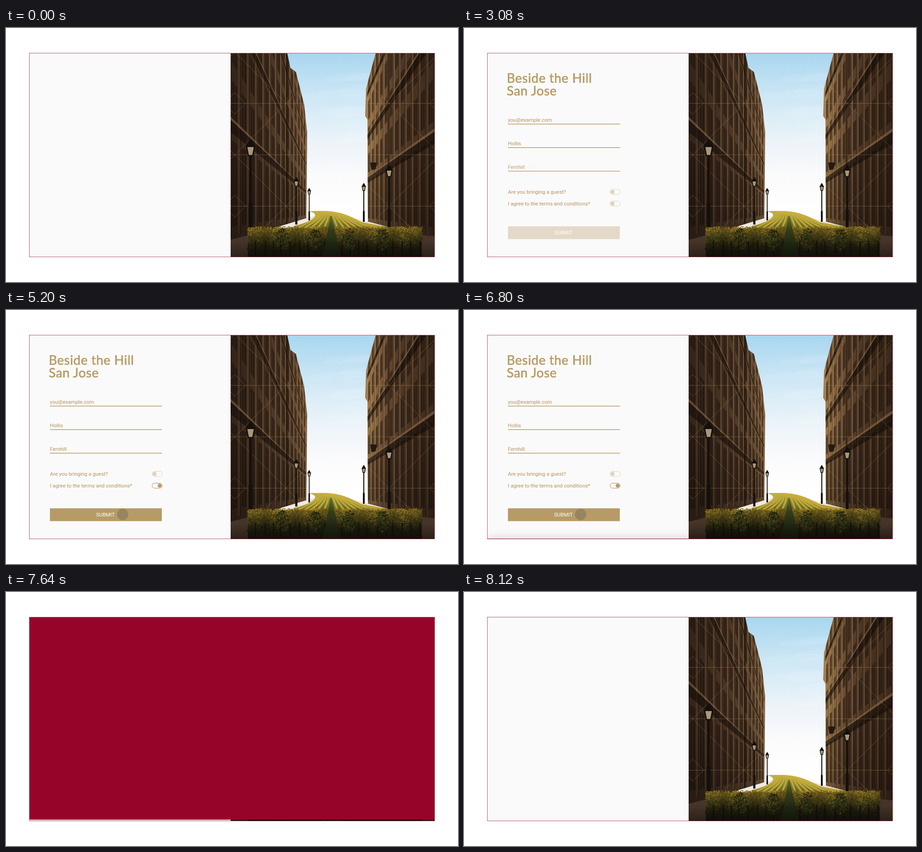
These frames come from a looping animation (998 by 561 pixels, 8320 ms). An HTML page with a canvas:

```html
<!DOCTYPE html>
<html lang="en">
<head>
<meta charset="utf-8">
<title>Event sign-up form</title>
<style>
  html, body { margin: 0; width: 100%; height: 100%; overflow: hidden; background: #fff; }
  body { position: relative; --gold: #b79b66; --pale: #e4d9c8; --faint: #dfd1ba; --ink: #b4915a; }
  .card { position: absolute; left: 52px; top: 56px; width: 894px; height: 450px; overflow: hidden; background: #fafafa; }
  canvas { position: absolute; right: 0; top: 0; }
  svg { position: absolute; left: -52px; top: -56px; }
  .frame { position: absolute; left: 51px; top: 55px; width: 894px; height: 449px; border: 1px solid rgba(150, 5, 41, .68); }
  text { font: 11.44px Roboto, sans-serif; }
  .title { font: 28px Lato, sans-serif; letter-spacing: .7px; fill: var(--gold); stroke: var(--gold); stroke-width: .7px; }
  .label, .val { fill: var(--ink); }
  .val { opacity: 0; }
  .ph, .dot { fill: var(--faint); }
  .line, .pill { fill: none; stroke: var(--faint); }
  .line { stroke-width: 1.6; }
  .btn { fill: var(--pale); }

  .form, .label, .field *, .on *, .btn, .hand, .hand circle, .wipe {
    animation-duration: 8.32s; animation-iteration-count: infinite; animation-timing-function: linear;
  }
  .form { animation-name: form; }
  .label { animation-name: label; }
  .field * { animation-delay: calc(var(--i) * .4s); }
  .field .ph { animation-name: leave; }
  .field .val { animation-name: enter; }
  .field .line { animation-name: line; }
  .on .pill { animation-name: pill; }
  .on .dot { animation-name: dot; }
  .btn { animation-name: btn; }
  .hand { animation-name: hand; }
  .hand circle { fill: rgba(77, 82, 82, .3); animation-name: press; }
  .wipe { position: absolute; inset: 0; background: #960529; box-shadow: 0 0 22px rgba(0, 0, 0, .17); animation-name: wipe; }

  @keyframes form {
    0%, 8.3% { opacity: 0; animation-timing-function: ease-in-out; }
    18.4%, 88% { opacity: 1; }
    88.01%, 100% { opacity: 0; }
  }
  @keyframes label {
    0%, 8.3% { opacity: .4; animation-timing-function: ease-out; }
    21.6%, 100% { opacity: 1; }
  }
  @keyframes leave {
    24.1% { opacity: 1; }
    28%, 92% { opacity: 0; }
    92.01% { opacity: 1; }
  }
  @keyframes enter {
    24.1% { opacity: 0; }
    28%, 92% { opacity: 1; }
    92.01% { opacity: 0; }
  }
  @keyframes line {
    24.1% { stroke: var(--faint); }
    28%, 92% { stroke: var(--gold); }
    92.01% { stroke: var(--faint); }
  }
  @keyframes pill {
    48.7% { stroke: var(--faint); }
    54.5%, 92% { stroke: var(--ink); }
    92.01% { stroke: var(--faint); }
  }
  @keyframes dot {
    48.7% { fill: var(--faint); transform: none; animation-timing-function: ease-out; }
    54.5%, 92% { fill: var(--gold); transform: translateX(11.3px); }
    92.01% { fill: var(--faint); transform: none; }
  }
  @keyframes btn {
    48.7% { fill: var(--pale); }
    53.4% { fill: #ece3d7; }
    58.6%, 92% { fill: var(--gold); }
    92.01% { fill: var(--pale); }
  }
  @keyframes hand {
    0%, 48.7% { transform: translate(355.5px, 387px); opacity: 0; }
    51.4% { transform: translate(355.5px, 387px); opacity: 1; }
    55.8% { transform: translate(355.5px, 387px); opacity: 1; animation-timing-function: ease-in-out; }
    62.7%, 100% { transform: translate(257.5px, 451.7px); opacity: 1; }
  }
  @keyframes press {
    0%, 67.3% { transform: none; animation-timing-function: ease-in-out; }
    69% { transform: scale(1.24); animation-timing-function: ease-in-out; }
    70.7%, 100% { transform: none; }
  }
  @keyframes wipe {
    0%, 81.53% { transform: translateY(100%); opacity: 0; }
    81.54% { transform: translateY(100%); opacity: 1; animation-timing-function: ease-in-out; }
    87.5% { transform: none; opacity: 1; }
    91.47% { transform: none; opacity: 1; animation-timing-function: ease-in-out; }
    97.48% { transform: translateY(-100%); opacity: 1; }
    97.49%, 100% { transform: translateY(-100%); opacity: 0; }
  }
</style>
</head>
<body>
<div class="card">
  <canvas width="450" height="450"></canvas>
  <svg width="998" height="561">
    <g class="form">
      <text class="title" x="94.5" y="121.3">Beside the Hill</text>
      <text class="title" x="94.5" y="148.8">San Jose</text>
      <g class="field" style="--i:0">
        <text class="ph" x="97" y="207.2">Email*</text>
        <text class="val" x="97" y="207.2">you@example.com</text>
        <path class="line" d="M97 212.2H344.5"/>
      </g>
      <g class="field" style="--i:1" transform="translate(0 52)">
        <text class="ph" x="97" y="207.2">First name*</text>
        <text class="val" x="97" y="207.2">Hollis</text>
        <path class="line" d="M97 212.2H344.5"/>
      </g>
      <g class="field" style="--i:2" transform="translate(0 104)">
        <text class="ph" x="97" y="207.2">Last name*</text>
        <text class="val" x="97" y="207.2">Fernhill</text>
        <path class="line" d="M97 212.2H344.5"/>
      </g>
      <text class="label" x="97" y="366.3">Are you bringing a guest?</text>
      <text class="label" x="97" y="392.2">I agree to the terms and conditions*</text>
      <g>
        <rect class="pill" x="322.5" y="356.5" width="22.5" height="11" rx="5.5"/>
        <circle class="dot" cx="328" cy="362" r="4.4"/>
      </g>
      <g class="on" transform="translate(0 26)">
        <rect class="pill" x="322.5" y="356.5" width="22.5" height="11" rx="5.5"/>
        <circle class="dot" cx="328" cy="362" r="4.4"/>
      </g>
      <rect class="btn" x="97" y="438" width="247" height="28.3"/>
      <text x="219.5" y="456.2" text-anchor="middle" fill="#fff">SUBMIT</text>
      <g class="hand"><circle r="12.5"/></g>
    </g>
  </svg>
  <div class="wipe"></div>
</div>
<div class="frame"></div>

<script>
const c = document.querySelector('canvas').getContext('2d');
c.translate(-496, -56);
const horizon = 405;

let seed = 7;
const rnd = () => (seed = seed * 16807 % 2147483647) / 2147483647;

function trace(...pts) {
  c.beginPath();
  for (let i = 0; i < pts.length; i += 2) c.lineTo(pts[i], pts[i + 1]);
  c.closePath();
}
function poly(fill, ...pts) {
  trace(...pts);
  c.fillStyle = fill;
  c.fill();
}
function box(fill, x, y, w, h) {
  c.fillStyle = fill;
  c.fillRect(x, y, w, h);
}
// Gradient with evenly spaced colours
function lin(x0, y0, x1, y1, ...cols) {
  const g = c.createLinearGradient(x0, y0, x1, y1);
  cols.forEach((col, i) => g.addColorStop(i / (cols.length - 1), col));
  return g;
}

// A wall receding from x = edge to its vanishing point; bays shrink by a fixed ratio
function street({ edge, vp, ratio, bays, corner, ledge, step, outline, paint }) {
  const reach = edge - vp;
  const at = (x, y) => horizon + (y - horizon) * (x - vp) / reach;
  const bay = i => vp + reach * ratio ** i;
  const band = (a, b, top, low, fill) =>
    poly(fill, a, at(a, top), b, at(b, top), b, at(b, low), a, at(a, low));

  c.save();
  trace(...outline);
  c.clip();
  box(paint, 496, 56, 450, 420);
  for (let i = 0; i < bays; i++) {
    const a = bay(i), w = bay(i + 1) - a, far = i / bays;
    for (let top = 245; top > -900; top -= 135) {
      const low = top > 200 ? 440 : top + 95;
      band(a + w * .2, a + w * .72, top, low, 'rgba(20,13,9,.5)');
      band(a + w * .42, a + w * .48, top, low, 'rgba(120,86,58,.25)');
    }
    band(a + w * .78, a + w, -900, 460, `rgba(200,152,98,${.1 + .35 * far})`);
    band(a, a + w * .1, -900, 460, 'rgba(12,7,4,.4)');
  }
  const end = bay(bays);
  for (let y = ledge; y > -900; y -= step) {
    band(edge, end, y, y + 7, 'rgba(176,132,88,.4)');
    band(edge, end, y + 7, y + 34, 'rgba(16,10,6,.55)');
  }
  box('rgba(20,12,7,.55)', corner - 2, 56, 4, 390);
  box(lin(0, 250, 0, 465, 'rgba(12,8,6,0)', 'rgba(12,8,6,.35)'), 496, 250, 450, 220);
  lattice();
  c.restore();
}

// Gold lines and diamonds, repeating every 227 px
function lattice() {
  const size = 227;
  c.strokeStyle = 'rgba(198,152,92,.42)';
  c.lineWidth = .9;
  c.beginPath();
  for (let i = -1; i < 3; i++) for (let j = -1; j < 3; j++) {
    const x = 505 + size * i, y = 53 + size * j;
    c.moveTo(x, y); c.lineTo(x + size, y + size);
    c.moveTo(x, y + size); c.lineTo(x + size, y);
    c.moveTo(x, y); c.lineTo(x + size, y);
    c.moveTo(x, y + size / 2); c.lineTo(x + size, y + size / 2);
    c.rect(x, y + size / 2, 0, 0);
    const m = y + size / 2, r = 24;
    c.moveTo(x, m - r); c.lineTo(x + r, m); c.lineTo(x, m + r); c.lineTo(x - r, m); c.closePath();
  }
  c.stroke();
}

function lamp(x, y, base) {
  const s = (base - y) / 194, ink = '#14100d', foot = (base - y) * .28;
  const glass = [x - 9 * s, y + 15 * s, x + 9 * s, y + 15 * s, x + 5 * s, y + 36 * s, x - 5 * s, y + 36 * s];
  poly('#a99778', ...glass);
  c.strokeStyle = ink;
  c.lineWidth = 3 * s;
  trace(...glass);
  c.stroke();
  poly(ink, x - 11 * s, y + 17 * s, x - 2 * s, y, x + 2 * s, y, x + 11 * s, y + 17 * s);
  box(ink, x - 2.5 * s, y + 36 * s, 5 * s, base - y - 36 * s);
  box(ink, x - 4.5 * s, base - foot, 9 * s, foot);
}

// Sky
box(lin(0, 56, 0, 400, '#a8d6ef', '#c3e2f3', '#dbedf7', '#eef4f9', '#fbfbfc', '#fff'), 496, 56, 450, 450);
for (let i = 0; i < 14; i++) {
  c.fillStyle = 'rgba(255,255,255,.06)';
  c.beginPath();
  c.ellipse(660 + 140 * rnd(), 100 + 160 * rnd(), 30 + 45 * rnd(), 5 + 9 * rnd(), -.1, 0, 7);
  c.fill();
}

street({
  edge: 495, vp: 712, ratio: .9, bays: 14, corner: 620, ledge: 195, step: 268,
  outline: [495, 56, 621, 56, 628, 88, 640, 97, 658, 168, 665, 230, 663, 422, 608, 438, 495, 470],
  paint: lin(495, 0, 665, 0, '#33241a', '#3b2a1d', '#4a3525', '#56402c', '#836443')
});
street({
  edge: 946, vp: 690, ratio: .93, bays: 12, corner: 845, ledge: 222, step: 226,
  outline: [946, 56, 816, 56, 795, 134, 793, 194, 798, 202, 799, 430, 842, 439, 946, 464],
  paint: lin(796, 0, 946, 0, '#a37e50', '#6f5237', '#4d3726', '#46311f', '#3a291c')
});
poly('#241a12', 804, 297, 819, 297, 816, 312, 807, 314);

// Pavements
poly('#46342a', 495, 468, 545, 455, 545, 506, 495, 506);
poly('#46342a', 946, 460, 905, 456, 905, 506, 946, 506);
poly('#efe8de', 604, 438, 690, 412, 680, 440);
poly('#eee5d8', 770, 420, 846, 440, 780, 440);

// Vineyard: a low crest with rows fanning out towards the hedge
c.save();
c.beginPath();
c.moveTo(636, 437);
c.bezierCurveTo(672, 430, 700, 412, 670, 405);
c.bezierCurveTo(735, 400, 755, 414, 786, 429);
c.lineTo(850, 441);
c.lineTo(850, 506);
c.lineTo(636, 506);
c.clip();
box(lin(0, 403, 0, 450, '#a5a545', '#83812c', '#4a501a'), 630, 400, 225, 106);
for (let i = -8; i <= 8; i++) {
  c.beginPath();
  c.moveTo(704 + i * 3.5, 403);
  c.bezierCurveTo(722 + i * 4, 410, 717 + i * 6, 422, 717 + i * 17, 447);
  c.strokeStyle = 'rgba(206,178,62,.8)';
  c.lineWidth = 4;
  c.stroke();
}
c.restore();

// Hedge: leaves darken towards the ground
box(lin(0, 440, 0, 506, '#5f5119', '#373214', '#1f1c0f', '#16140d'), 534, 442, 384, 64);
for (let i = 0; i < 3800; i++) {
  const x = 532 + 386 * rnd(), d = rnd() ** 1.25;
  const clump = Math.sin(x / 11) * .1 + Math.sin(x / 5) * .05;
  const light = Math.max(7, 33 - 36 * (d + clump) + 12 * (rnd() - .5));
  c.fillStyle = `hsl(${45 + 24 * d * rnd()} ${64 - 26 * d}% ${light}%)`;
  c.fillRect(x, 438 + 62 * d, 1.2 + 1.8 * rnd(), 1.2 + 1.6 * rnd());
}
for (let x = 548; x < 915; x += 19) box('rgba(14,11,8,.7)', x + 5 * rnd(), 470, 2.5, 32);
for (let x = 608; x < 850; x += 74) for (let i = 0; i < 130; i++) {
  const a = rnd() * 7, q = Math.sqrt(rnd());
  box(`hsl(${52 + 25 * rnd()} 42% ${7 + 11 * rnd()}%)`, x + Math.cos(a) * q * 15, 466 + Math.sin(a) * q * 24, 3, 3);
}
poly(lin(0, 415, 0, 506, '#69702b', '#343d19', '#1f2812', '#1a2010'), 716, 415, 719, 415, 731, 470, 740, 506, 697, 506, 707, 470);
box(lin(0, 470, 0, 506, 'rgba(10,9,6,0)', 'rgba(10,9,6,.45)'), 496, 470, 450, 36);

lamp(540, 246, 440);
lamp(641, 330, 434);
lamp(669.5, 354, 425);
lamp(790, 343, 428);
lamp(846, 303, 440);
</script>
</body>
</html>
```
